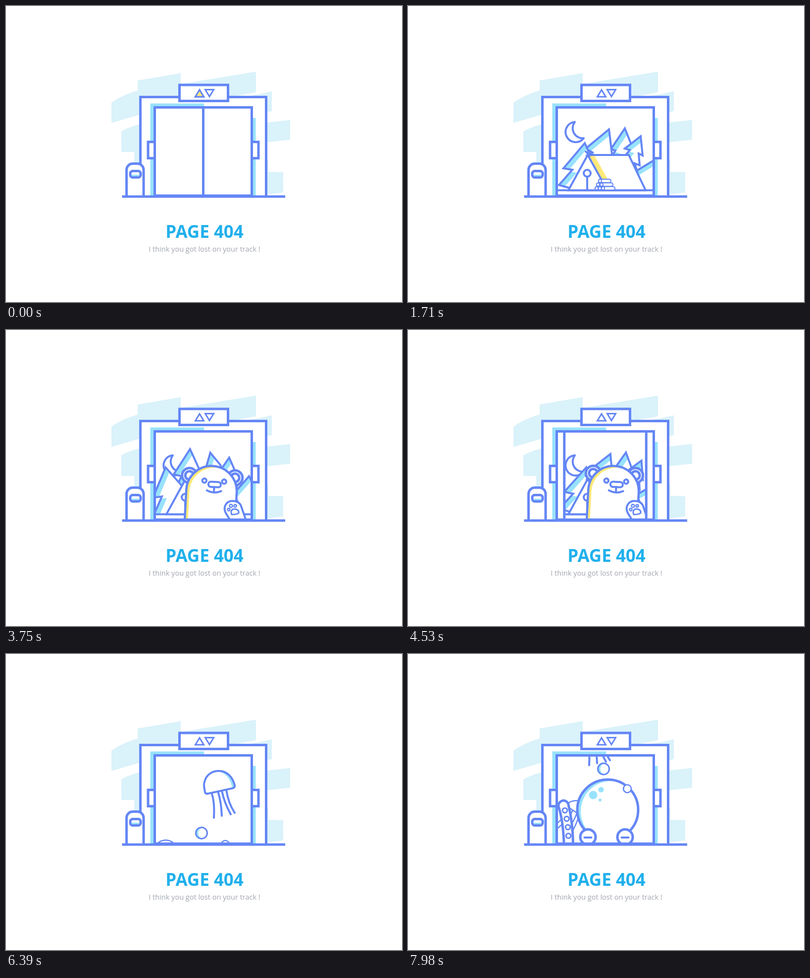
An HTML page that plays this animation: 800 px wide and 600 px high, repeating every 8 s.

```html
<!DOCTYPE html>
<html lang="en">
<head>
<meta charset="utf-8">
<title>Page 404</title>
<style>
  html, body { margin: 0; width: 100%; height: 100%; overflow: hidden; background: #fff; }
  svg { display: block; width: 100vw; height: 100vh; }
  .line { fill: #fff; stroke: #6486f5; stroke-width: 5; }
  .mid { stroke-width: 4; }
  .thin { stroke-width: 3; }
  .open { fill: none; stroke-linecap: round; }
  .brush { fill: #daf2fa; }
  .cyan { fill: #98e2fb; }
  .title { font: 700 35px "Open Sans", "Noto Sans", sans-serif; fill: #20b0ec; }
  .note { font: 14.5px "Open Sans", "Noto Sans", sans-serif; fill: #a2a6af; }
  text { text-anchor: middle; }
</style>
</head>
<body>
<svg viewBox="0 0 800 600">
  <defs>
    <clipPath id="cabin"><rect x="300" y="205" width="197" height="180"/></clipPath>
  </defs>

  <g class="brush">
    <path d="M266 151L353 136V158L505 133V175L450 185L266 195Z"/>
    <path d="M213 196Q236 179 275 169V219L213 237Z"/>
    <path d="M233 254Q250 244 275 239V320H259V296H233Z"/>
    <path d="M495 182L537 173V213L520 217Z"/>
    <path d="M520 237L574 231V271L520 277Z"/>
    <path d="M520 313H530V336L560 337V378L520 383Z"/>
  </g>

  <path class="line" d="M271.5 386V184.5H525.5V386"/>
  <path class="cyan" d="M291.5 386V197.5H400.5V227H504.5V386Z"/>
  <path fill="#fff" d="M400.5 190H504.5V227H400.5Z"/>
  <rect class="line" x="287" y="275.5" width="13.5" height="33"/>
  <rect class="line" x="496.5" y="275.5" width="13.5" height="33"/>
  <rect class="line" x="350.5" y="160" width="98" height="32.5"/>
  <path class="line thin" d="M391 170L382.5 184H399.5Z"/>
  <path id="lamp" class="line thin" style="fill:#ffe977" d="M391 170L382.5 184H399.5Z"/>
  <path class="line thin" d="M411 183.5L402.5 169.5H419.5Z"/>

  <rect fill="#fff" x="300" y="205" width="197" height="180"/>
  <g clip-path="url(#cabin)">
    <g id="camp">
      <path id="moon" class="line mid" stroke-linejoin="round"
            d="M337 235A20.5 20.5 0 1 0 355 268A20.5 20.5 0 0 1 337 235Z"/>
      <g id="trees"></g>
      <rect class="line mid" x="290" y="373.5" width="220" height="30"/>
      <path class="line mid" d="M324 373.5L363 302H446L480 373.5Z"/>
      <path fill="#ffe977" d="M366 304H377L405 354L395 356Z"/>
      <path class="line mid open" d="M363 302L402 372M359 295L368 303M371 297L361 303M362 346V373"/>
      <circle class="line mid" cx="362" cy="339" r="7"/>
      <g id="logs"></g>
      <g id="bear">
        <g id="bearBody"></g>
        <g id="arm">
          <path class="line mid" d="M457 392L444 371C437 357 447 346.500 457 346.500C466 346.500 472 349 475 357L487 392Z"/>
          <circle class="line" style="stroke-width:2.5" cx="450" cy="364" r="2.500"/>
          <circle class="line" style="stroke-width:2.5" cx="454.500" cy="356.500" r="3"/>
          <circle class="line" style="stroke-width:2.5" cx="463" cy="356.500" r="2.500"/>
          <path class="line thin" d="M456 374C453 367 457 362 462 363C468 363 471 367 470 371C467 374 461 374 456 374Z"/>
        </g>
      </g>
    </g>

    <g id="sea">
      <g id="jelly"></g>
      <g id="smallJelly">
        <path class="line" style="stroke-width:2.5" d="M321 305A24 24 0 0 1 361 330L357 333L322 309Z"/>
        <path class="line open" style="stroke-width:2.5"
              d="M325 312Q316 330 303 342M333 317Q323 336 304 352M341 323Q335 340 322 357M346 327Q340 345 330 364"/>
      </g>
      <g id="octopus"></g>
      <g id="tentacle">
        <path class="line" d="M315 440Q318 350 304 309A10.300 10.300 0 0 1 323.500 303Q333 340 333.500 385V440Z"/>
      </g>
      <g id="bubbleA"></g>
      <g id="bubbleB"></g>
    </g>

    <rect id="doorL" class="line" x="198.5" y="190" width="200" height="220"/>
    <rect id="doorR" class="line" x="398.5" y="190" width="200" height="220"/>
  </g>
  <rect class="line" style="fill:none" x="300.5" y="205.5" width="196" height="179"/>

  <path class="line" d="M243.500 386V332A12.500 12.500 0 0 1 256 319.500H265.500A12.500 12.500 0 0 1 278 332V386"/>
  <rect class="line" x="251" y="334.5" width="21" height="13" rx="5"/>
  <rect class="cyan" x="254" y="342" width="15" height="3"/>
  <path class="line" d="M234.500 386.300H564"/>

  <text class="title" x="401" y="470">PAGE 404</text>
  <text class="note" x="401" y="498">I think you got lost on your track !</text>
</svg>

<script>
const el = id => document.getElementById(id);
const move = (id, transform) => el(id).setAttribute('transform', transform);
const circle = (x, y, r, cls = 'line', extra = '') =>
  `<circle class="${cls}" cx="${x}" cy="${y}" r="${r}" ${extra}/>`;

// Outlined shape with a tinted rim: a white copy, shifted and clipped, leaves the rim free.
let clips = 0;
function shaded(d, dx, dy, width = 4, tint = '#98e2fb') {
  const id = 'clip' + clips++;
  return `<clipPath id="${id}"><path d="${d}"/></clipPath>
    <g clip-path="url(#${id})"><path d="${d}" fill="${tint}"/>
    <path d="${d}" fill="#fff" transform="translate(${dx} ${dy})"/></g>
    <path class="line" d="${d}" style="fill:none;stroke-width:${width}"/>`;
}
const ring = (x, y, r) => `M${x - r} ${y}a${r} ${r} 0 1 1 ${2 * r} 0a${r} ${r} 0 1 1 ${-2 * r} 0Z`;

const trees = [
  { pivot: '505 400', d: 'M523 297L455 338L470 395H540Z' },
  { pivot: '428 330', d: 'M438 248L410 290L419 293L405 315L455 318L450 278Z' },
  { pivot: '443 323', d: 'M470 264L438 289L448 292L436 307L445 340L463 336L458 319L468 323L466 299L474 303Z' },
  { pivot: '361 356', d: 'M406 250L359 289L373 297L350 322L405 340L412 300Z' },
  { pivot: '341 390', d: 'M357 278L314 329L332 332L305 363L327 369L341 395L380 375L372 345L383 337Z' }
];
el('trees').innerHTML = trees.map(tree => `<g>${shaded(tree.d, 9, 6)}</g>`).join('');

const log = (x, y, w) =>
  `<rect class="line" style="stroke-width:2" x="${x}" y="${y}" width="${w}" height="7" rx="3.500"/>`;
const logEnd = (x, y) => circle(x, y, 3.2, 'line', 'style="stroke-width:2"');
el('logs').innerHTML = log(385, 351, 25) + log(381, 358.5, 33) + log(378, 366, 40) +
  [[388, 354.5], [384, 362], [391, 362], [381, 369.5], [387.5, 369.5], [394, 369.5]]
    .map(p => logEnd(...p)).join('');

const ear = id => `<g id="${id}">${circle(411.5, 279, 15)}${circle(411.5, 279, 8.5)}</g>`;
el('bearBody').innerHTML = ear('earL') + ear('earR') +
  shaded('M360.500 520V333.500A51 51 0 0 1 462.500 333.500V520Z', 6.5, 3, 4.5, '#ffe977') +
  `<g id="face">${circle(391, 310, 4.3, 'line mid')}${circle(431, 310, 4.3, 'line mid')}
    <rect class="line mid" x="399.5" y="311.5" width="25" height="10.500" rx="5"/>
    <path class="line mid open" d="M411.500 322V331M397 329.500Q411.500 336.500 426 329.500"/></g>`;

el('jelly').innerHTML =
  `<path class="line mid open" d="M415 281Q422 300 420 332M428 278Q435 300 436 328M436 277Q441 302 454 325M445 275Q449 302 462 322"/>` +
  shaded('M400 268C400 250 412 237 430 237C447 237 458 250 462 266Q463 270 459 272L408 283Q403 284 402 280Z', -6, 1);

const eye = x => circle(x, 371, 15.5) +
  `<path class="line mid open" d="M${x - 7} 372H${x + 7}"/>`;
el('octopus').innerHTML =
  shaded('M361.600 361A61.500 61.500 0 1 1 445.400 361V600H361.600Z', 7, 3, 5) +
  circle(374, 286, 8.5, 'cyan') + circle(390, 275, 5.5, 'cyan') + circle(388, 296, 3, 'cyan') +
  eye(363.5) + eye(438.5);

el('tentacle').innerHTML += [[317, 317], [320.5, 334], [323, 351], [324, 368.5]]
  .map(([x, y]) => circle(x, y, 4.8, 'line thin')).join('');
el('bubbleA').innerHTML = shaded(ring(395, 363, 11.5), 5, 0, 3);
el('bubbleB').innerHTML = shaded(ring(443, 386, 8), 2, 0, 2.5);

const inOut = p => p < .5 ? 4 * p ** 3 : 1 - 4 * (1 - p) ** 3;
const out = p => 1 - (1 - p) ** 3;
const linear = p => p;
const ramp = (t, from, to, ease = inOut) =>
  ease(Math.min(1, Math.max(0, (t - from) / (to - from))));
const wave = (t, peak, period) => Math.cos(2 * Math.PI * (t - peak) / period);

function drawCamp(t) {
  move('moon', `translate(0 ${19.8 * ramp(t, 1650, 3300, linear) - .7})`);

  const sway = 10 * (wave(t, 3160, 1320) - .814);
  [...el('trees').children].forEach((node, i) =>
    node.setAttribute('transform', `rotate(${sway} ${trees[i].pivot})`));

  const lean = ramp(t, 2680, 3350);
  const earAngle = 44 + 13 * ramp(t, 2950, 3650) - 6 * ramp(t, 3800, 4500);
  move('bear', `translate(0 ${125 * (1 - ramp(t, 1770, 2400, out))})`);
  move('bearBody', `translate(${lean} ${-7 * lean}) rotate(${3 * lean} 411 384)`);
  move('earL', `rotate(${-earAngle} 411.5 334)`);
  move('earR', `rotate(${earAngle} 411.5 334)`);
  move('face', `translate(${5 * lean} ${3 * lean})`);
  const hidden = 1 - ramp(t, 2950, 3500, out);
  move('arm', `translate(${18 * hidden} ${50 * hidden})`);
}

function drawSea(t) {
  const p = (t - 6390) / 1590;
  move('jelly', `translate(${-54 * p} ${-106.5 * p})`);
  move('smallJelly', `translate(${-16 * (1 - p)} ${80 * (1 - p)})`);
  move('bubbleA', `translate(0 ${-130 * p})`);
  move('bubbleB', `translate(0 ${-113 * p})`);
  move('octopus', `translate(0 ${145 * (1 - ramp(t, 6560, 7330, out))})`);
  move('tentacle', `translate(0 ${100 * (1 - ramp(t, 7150, 7900, out))})`);
}

function draw() {
  const t = performance.now() % 8000;
  const gap = 98 * (ramp(t, 840, 1580) - ramp(t, 4260, 5060) + ramp(t, 5690, 6360));
  const lit = t < 780 ? wave(t, 0, 520) : t > 5070 && t < 5590 ? wave(t, 5330, 520) : -1;
  const atSea = t > 5300;

  el('lamp').style.opacity = (1 + lit) / 2;
  move('doorL', `translate(${-gap} 0)`);
  move('doorR', `translate(${gap} 0)`);
  el('camp').style.display = atSea ? 'none' : '';
  el('sea').style.display = atSea ? '' : 'none';
  atSea ? drawSea(t) : drawCamp(t);
  requestAnimationFrame(draw);
}
draw();
</script>
</body>
</html>
```
